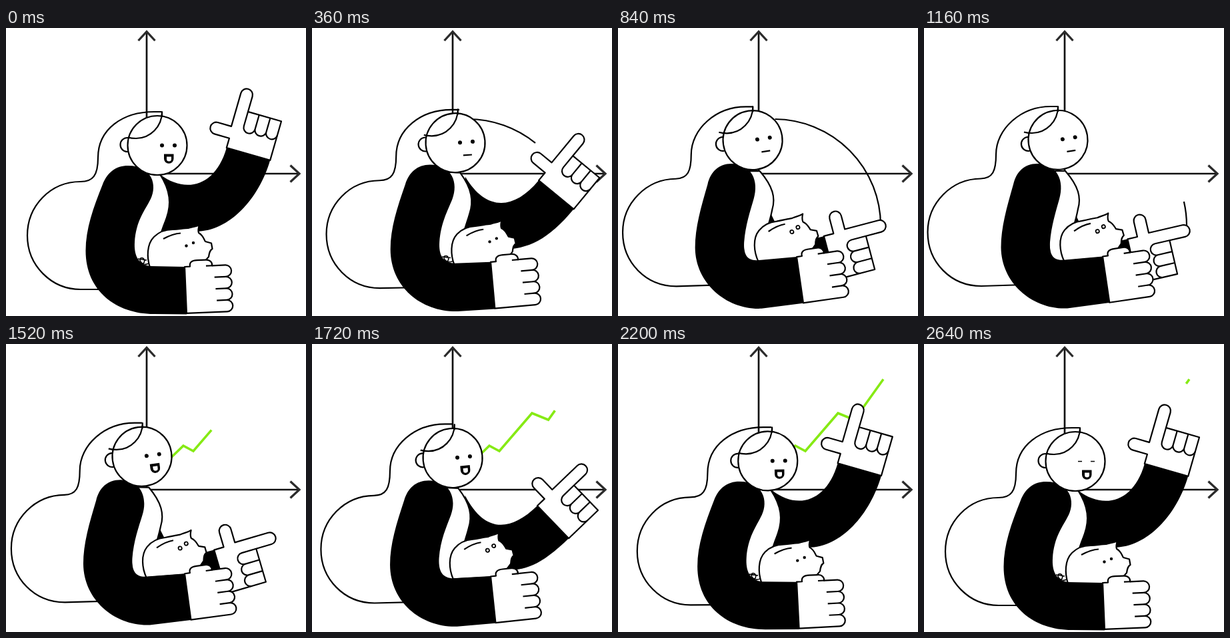
An HTML page that plays this animation: 450 by 433 pixels, repeating every 2680 ms.

```html
<!DOCTYPE html>
<html lang="en">
<head>
<meta charset="utf-8">
<title>Chart and piggy bank</title>
<style>
  html, body { margin: 0; width: 100%; height: 100%; overflow: hidden; background: #fff; }
  svg { display: block; width: 100vw; height: 100vh; }
  .line { fill: none; stroke: #000; stroke-width: 2.2; stroke-linejoin: round; }
  .skin { fill: #fff; stroke: #000; stroke-width: 2.2; stroke-linejoin: round; }
  .thin { stroke-width: 1.6; }
  .axis { fill: none; stroke: #111; stroke-width: 2.7; }
  .tip { stroke: #2b2b2b; stroke-width: 3.3; }
  .growth { fill: none; stroke: #86ea14; stroke-width: 3.6; }
</style>
</head>
<body>
<svg viewBox="0 0 450 433">
  <path class="axis" d="M211 219V6M211 219H439"/>
  <path class="axis tip" d="M198.500 19L211 5.500L223.500 19M426.500 206.500L440 219L426.500 231.500"/>
  <path id="sweep" class="line" pathLength="1" d="M234 137A160 160 0 0 1 394 297"/>
  <path id="growth" class="growth" pathLength="1" d="M238 180L266 153L281 161L330 104L354.500 114L398 53"/>
  <path id="hair" class="line"/>

  <path id="sleeve"/>
  <g id="pointer">
    <path class="skin" d="M-34 0V-15H-57a9 9 0 0 1 0-18H-36V-85a9 9 0 0 1 18 0V-61H34V0Z"/>
    <path class="line" d="M-18-61V-38.500a8.700 8.700 0 0 0 17.400 0V-61M-.6-38.500a8.700 8.700 0 0 0 17.300 0V-61M16.700-38.500a8.700 8.700 0 0 0 17.300 0"/>
  </g>

  <path id="torso" class="skin"/>
  <g id="pig">
    <path id="tail" class="line thin" d="M214 354C206 358 198 350 202 346C207 344 210 351 205 355M198 347L211 349"/>
    <path class="skin" d="M216 360C211 345 211 325 222 314C230 306 240 303 250 303C262 302 268 301 273 301C278 299 285 299 290 296C288 302 288 305 289 308C296 312 297 318 299 321L308 323.500L309.500 332C306 334 305 337 304 344L298 351V362Z"/>
    <path class="line" d="M236 317C245 312 253 309 262 308.500"/>
    <g id="pigEyes">
      <circle cx="270.500" cy="327.500"/>
      <circle cx="281" cy="323"/>
    </g>
  </g>

  <path id="arm"/>
  <g id="fist">
    <path class="skin" d="M0 0H8C7-7 12-9 19-9H32C39-9 42-4 41 0H61a8.750 8.750 0 0 1 0 17.500a8.750 8.750 0 0 1 0 17.500a8.750 8.750 0 0 1 0 17.500a8.750 8.750 0 0 1 0 17.500H0Z"/>
    <path class="line" d="M32 0H42M44 17.500H61M45 35H61M46 52.500H61"/>
  </g>

  <g id="head">
    <circle class="skin" cx="-45" cy="-1" r="10.500"/>
    <circle class="skin" r="44.500"/>
    <g id="eyes"><circle cx="7" r="3"/><circle cx="26" r="3"/></g>
    <path id="blink" class="line thin" d="M4 0H10M23 0H29"/>
    <path id="calm" class="line" d="M10.500 19.500H23.500"/>
    <g id="smile" transform="translate(17.500 20)">
      <path d="M-7.500-7H7V0A7.250 7.250 0 0 1-7.500 0Z"/>
      <path fill="#fff" d="M-3.500-3H3.500V.5A3.500 3.500 0 0 1-3.500 .5Z"/>
    </g>
  </g>
  <path id="fringe" class="line" d="M234 134V126A39 40 0 0 1 195 166Q188 166 183 164.500"/>
</svg>
<script>
const LOOP = 2680, STEP = 40, LAG = 50;
const $ = id => document.getElementById(id);
const lerp = (a, b, k) => a + (b - a) * k;

// Tracks: [time, value] pairs joined by a smooth monotone curve
const lean = [[0, 0], [360, .46], [840, .96], [1160, 1], [1520, .885], [1920, .31], [2440, 0]];
const swing = [[0, 0], [360, .385], [840, .97], [1160, 1], [1520, .945], [1920, .04], [2160, 0]];
const sweepEnd = [[80, 0], [360, .435], [720, 1]];
const sweepStart = [[820, 0], [1160, .855], [1240, 1]];
const growthEnd = [[1280, 0], [1520, .42], [1920, .985], [1960, 1]];
const growthStart = [[2080, 0], [2640, .965], [2680, 1]];

function slope(keys, i) {
  if (i === 0 || i === keys.length - 1) return 0;
  const rate = n => (keys[n + 1][1] - keys[n][1]) / (keys[n + 1][0] - keys[n][0]);
  const a = rate(i - 1), b = rate(i);
  return a * b > 0 ? 2 * a * b / (a + b) : 0;
}

function at(keys, t) {
  const last = keys.length - 1;
  if (t <= keys[0][0]) return keys[0][1];
  if (t >= keys[last][0]) return keys[last][1];
  let i = 0;
  while (t > keys[i + 1][0]) i++;
  const [t0, a] = keys[i], [t1, b] = keys[i + 1];
  const d = t1 - t0, x = (t - t0) / d, y = 1 - x;
  return a * y * y * (1 + 2 * x) + b * x * x * (3 - 2 * x)
    + d * x * y * (slope(keys, i) * y - slope(keys, i + 1) * x);
}

// Each shape has an upright and a leaning pose with matching numbers
const poses = {
  hair: [
    "M234 126H222C175 126 138 152 138 195C138 222 130 231 112 231C66 231 32 268 32 312C32 357 68 393 112 393L150 393",
    "M201 118H190C145 118 108 152 108 190C108 215 103 226 85 226.500C41 227 5.500 263 5.500 307C5.500 352 40 388 86 388L150 386"],
  torso: [
    "M192 350L185 215L231 220C247 245 248 265 241 285C236 300 232 305 228 325",
    "M189 342L175 215L212 215C232 238 236 255 231 272C229 283 227 290 224 300"],
  arm: [
    "M183 207C165 207 152 217 145 235C131 270 119.500 302 119.500 335C119.500 395 165 430 222 430L271 430.500L268 359L217 358C197 356 192 340 193 322C195 290 208 275 217 257C227 237 220 207 183 207Z",
    "M170 204C150 204 138 217 134 235C124 270 115.500 300 115.500 330C116 385 165 424 215 421.500L278 413L268 343.500L212 348.500C193 351 188 340 189 322C191 297 198 275 203 257C211 230 200 204 170 204Z"]
};

function mix([a, b], k) {
  const ends = b.match(/[\d.]+/g);
  let i = 0;
  return a.replace(/[\d.]+/g, n => lerp(+n, +ends[i++], k).toFixed(2));
}

function trim(path, start, end) {
  path.style.visibility = end - start > .001 ? "visible" : "hidden";
  path.setAttribute("stroke-dasharray", `${Math.max(0, end - start)} 2`);
  path.setAttribute("stroke-dashoffset", -start);
}

const move = (id, x, y, turn, rest = "") =>
  $(id).setAttribute("transform", `translate(${x} ${y}) rotate(${turn}) ${rest}`);
const show = (id, on) => $(id).style.display = on ? "" : "none";

function drawPointer(p, q) {
  const x = 363.5 + 62 * q - 98.5 * q * q - 14 * p;
  const y = 189.5 + 171 * q - 10 * p;
  const turn = -74 + 61 * q, r = turn * Math.PI / 180;
  const c = Math.cos(r), s = Math.sin(r);
  // u runs along the forearm, v across the cuff
  const pt = (u, v) => `${x + u * c - v * s} ${y + u * s + v * c}`;
  const bottom = 306 + 70 * q;
  $("sleeve").setAttribute("d",
    `M${231 - 3 * q} ${220 + 62 * q ** 3}` +
    `C${270 - 25 * q} ${250 + 65 * q} ${pt(-60, -34)} ${pt(0, -34)}` +
    `L${pt(0, 34)}C${pt(-60, 34)} ${335 - 30 * q} ${bottom} 285 ${bottom}` +
    `L228 310Z`);
  move("pointer", x, y, turn + 90);
}

function drawPig(p) {
  move("pig", lerp(309, 298.5, p), lerp(325, 305, p), -6.5 * p, "translate(-309 -325)");
  const startled = p > .7, eyes = $("pigEyes");
  show("tail", !startled);
  eyes.setAttribute("transform", startled ? "translate(0 -7) rotate(-8 276 325)" : "");
  eyes.setAttribute("fill", startled ? "#fff" : "#000");
  eyes.setAttribute("stroke", startled ? "#000" : "none");
  eyes.setAttribute("stroke-width", 1.8);
  for (const eye of eyes.children) eye.setAttribute("r", startled ? 2.6 : 2.2);
}

function draw(t) {
  const p = at(lean, t), q = at(swing, t), late = at(lean, t - LAG);
  $("hair").setAttribute("d", mix(poses.hair, late));
  $("torso").setAttribute("d", mix(poses.torso, p));
  $("arm").setAttribute("d", mix(poses.arm, p));
  drawPointer(p, q);
  drawPig(late);
  move("fist", 268, lerp(359, 343.5, p), -2.4 - 6 * p);
  move("head", lerp(227, 201, p), lerp(176.5, 168.3, p), -9 * p);
  move("fringe", -33 * p, -8 * p, 0);

  const happy = t < 200 || t >= 1360, blinking = t >= 2600;
  show("smile", happy);
  show("calm", !happy);
  show("eyes", !blinking);
  show("blink", blinking);

  trim($("sweep"), at(sweepStart, t), at(sweepEnd, t));
  trim($("growth"), at(growthStart, t), at(growthEnd, t));
}

const begin = performance.now();
function tick() {
  const t = (performance.now() - begin) % LOOP;
  draw(Math.floor(t / STEP) * STEP);
  requestAnimationFrame(tick);
}
tick();
</script>
</body>
</html>
```
